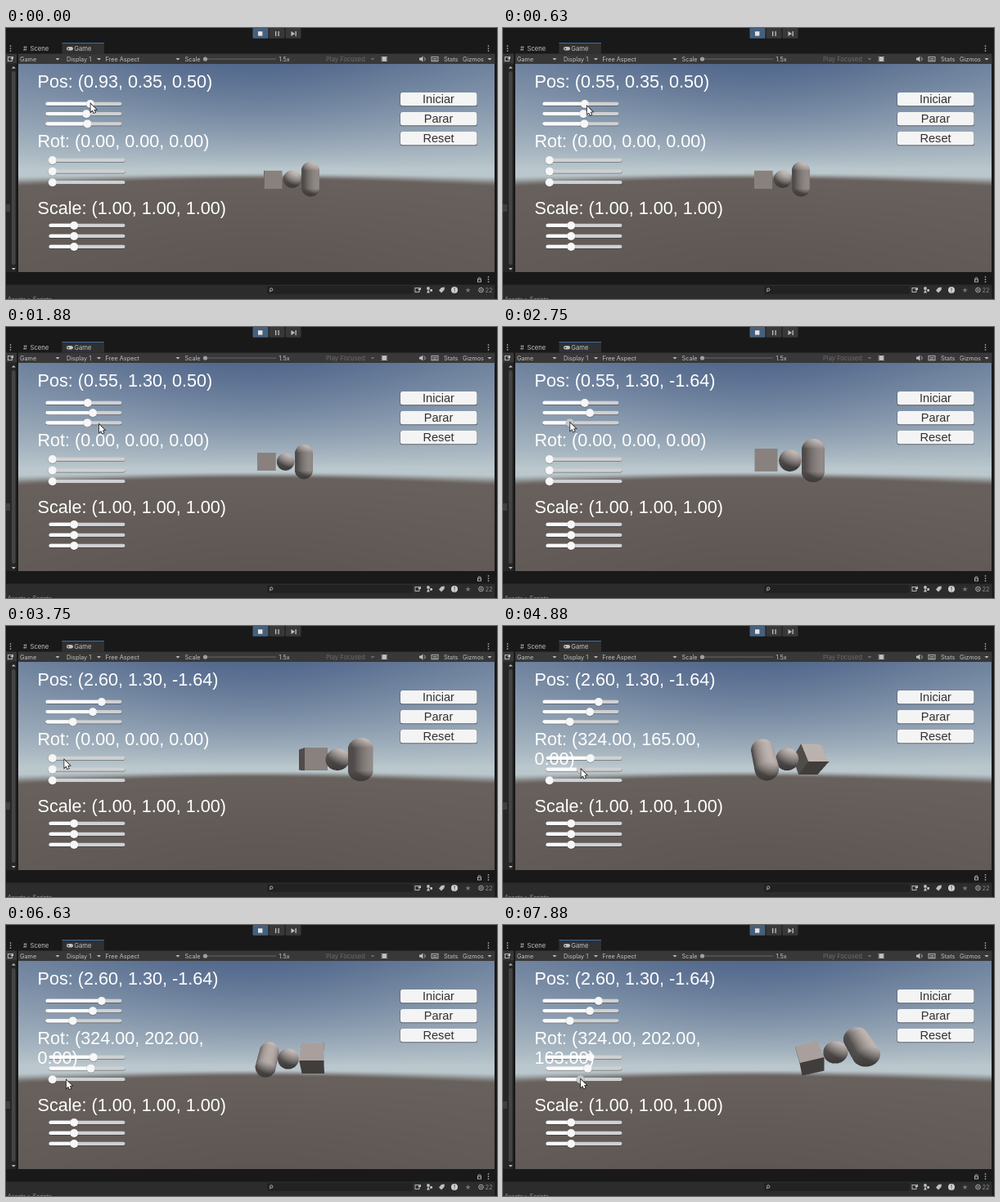
An HTML page with a canvas that plays this animation: 600x332 px, repeating every 8000 ms.

```html
<!DOCTYPE html>
<html lang="es">
<head>
<meta charset="utf-8">
<title>Transform sliders</title>
<style>
html, body { margin: 0; width: 100%; height: 100%; overflow: hidden; background: #191919; }
canvas { display: block; }
</style>
</head>
<body>
<canvas id="stage" width="600" height="332"></canvas>
<script>
const g = document.getElementById('stage').getContext('2d');
const LOOP = 8000, STEP = 125;
const VIEW = { x: 15, y: 44, w: 582, h: 255 };
const CX = 306, CY = 171.5, FOCAL = 220.8;
const UI = 'Inter, "Open Sans", sans-serif';
const LABEL = '"Liberation Sans", Arial, sans-serif';
const INK = '#c0c0c0', BAR = '#383838';

const clamp = (v, a, b) => Math.max(a, Math.min(b, v));
const mix = (a, b, u) => a + (b - a) * u;
const easeOut = u => 1 - (1 - u) ** 2;
const smooth = (a, b, v) => { const u = clamp((v - a) / (b - a), 0, 1); return u * u * (3 - 2 * u); };
const dot = (a, b) => a[0] * b[0] + a[1] * b[1] + a[2] * b[2];

// Slider groups: first row, row gap, knob place for 0 and pixels per unit
const GROUPS = {
  Pos: { left: 48.5, top: 93, gap: 12.2, zero: 95.3, unit: 8.3, start: [.93, .35, .5], textY: 73 },
  Rot: { left: 52.5, top: 162, gap: 13.65, zero: 56.8, unit: .232, start: [0, 0, 0], textY: 145.7 },
  Scale: { left: 52.5, top: 242, gap: 13, zero: 52.5, unit: 30.7, start: [1, 1, 1], textY: 227.7 }
};
const DRAGS = [
  { group: 'Pos', row: 0, from: 0, until: 500, to: .55 },
  { group: 'Pos', row: 1, from: 1250, until: 1750, to: 1.3 },
  { group: 'Pos', row: 2, from: 2000, until: 2750, to: -1.64 },
  { group: 'Pos', row: 0, from: 3000, until: 3500, to: 2.6 },
  { group: 'Rot', row: 0, from: 3875, until: 4375, to: 216 },
  { group: 'Rot', row: 1, from: 4500, until: 5156, to: 202 },
  { group: 'Rot', row: 2, from: 6875, until: 7875, to: 163 }
];

function valueAt(group, row, t) {
  let v = GROUPS[group].start[row];
  for (const d of DRAGS)
    if (d.group === group && d.row === row && t > d.from)
      v = mix(v, d.to, easeOut(Math.min(1, (t - d.from) / (d.until - d.from))));
  return v;
}
function knobAt(group, row, t) {
  const s = GROUPS[group];
  return [s.zero + s.unit * valueAt(group, row, t), s.top + s.gap * row];
}

// The pointer rides the dragged knob, then comes to the next one from its right
function pointerAt(t) {
  const i = DRAGS.findLastIndex(d => d.from <= t), d = DRAGS[i], next = DRAGS[i + 1];
  const here = knobAt(d.group, d.row, t);
  if (t <= d.until || !next) return here;
  const goal = knobAt(next.group, next.row, t), hover = [goal[0] + 14, goal[1] + 2];
  const arrive = next.from - STEP;
  return t <= arrive
    ? here.map((v, k) => mix(v, hover[k], (t - d.until) / (arrive - d.until)))
    : hover.map((v, k) => mix(v, goal[k], (t - arrive) / STEP));
}

const layer = (w, h) => Object.assign(document.createElement('canvas'), { width: w, height: h });

function rect(x, y, w, h, color, r = 0) {
  g.fillStyle = color;
  g.beginPath();
  g.roundRect(x, y, w, h, r);
  g.fill();
}
function disc(x, y, r, color) {
  g.fillStyle = color;
  g.beginPath();
  g.arc(x, y, r, 0, 7);
  g.fill();
}
function ring(x, y, r, from = 0, to = 7) {
  g.beginPath();
  g.arc(x, y, r, from, to);
  g.stroke();
}
function poly(color, ...p) {
  g.fillStyle = color;
  g.beginPath();
  for (let i = 0; i < p.length; i += 2) g.lineTo(p[i], p[i + 1]);
  g.closePath();
  g.fill();
}
function text(s, x, y, size, color = INK, family = UI, align = 'left') {
  g.font = size + 'px ' + family;
  g.textAlign = align;
  g.fillStyle = color;
  g.fillText(s, x, y);
}
const arrow = (x, y, d = 1, c = INK) => poly(c, x - 2.5, y - d, x + 2.5, y - d, x, y + 1.6 * d);
const dots = (x, y) => [-3, 0, 3].forEach(d => rect(x - .7, y + d - .7, 1.4, 1.4, INK));

// The skybox depends on the elevation of the view ray only
function bakeSky() {
  const zenith = [82, 104, 140], haze = [186, 199, 204], ground = [105, 98, 94];
  const c = layer(VIEW.w, VIEW.h), k = c.getContext('2d');
  const img = k.createImageData(VIEW.w, VIEW.h);
  let i = 0;
  for (let y = 0; y < VIEW.h; y++) for (let x = 0; x < VIEW.w; x++) {
    const dy = y + .5 + VIEW.y - CY;
    const e = dy / Math.hypot(x + VIEW.x - CX, dy, FOCAL);
    const high = clamp(-e / .5, 0, 1) ** .8, low = smooth(.025, .065, e);
    for (let n = 0; n < 3; n++)
      img.data[i++] = mix(mix(haze[n], zenith[n], high), ground[n] - 24 * e, low);
    img.data[i++] = 255;
  }
  k.putImageData(img, 0, 0);
  return c;
}
const sky = bakeSky();

function turn(v, i, j, deg) {
  const a = deg * Math.PI / 180, c = Math.cos(a), s = Math.sin(a), r = v.slice();
  r[i] = v[i] * c - v[j] * s;
  r[j] = v[i] * s + v[j] * c;
  return r;
}
const euler = (v, x, y, z) => turn(turn(turn(v, 0, 1, z), 1, 2, x), 2, 0, y);
const SUN = euler([0, 0, -1], 50, -30, 0);

// Ray-marches one solid in its local space: a cube, or a capsule with a core of length 2 * half
function drawSolid({ cube, half, c }, axes) {
  const SS = 2, local = v => axes.map(a => dot(a, v));
  const o = local(c.map(v => -v)), sun = local(SUN), up = local([0, 1, 0]);
  const dist = Math.hypot(...c), r = Math.ceil(FOCAL * 1.1 / (c[2] - .5));
  const x0 = Math.floor(CX + FOCAL * c[0] / c[2]) - r, y0 = Math.floor(CY - FOCAL * c[1] / c[2]) - r;
  const n = 2 * r * SS, out = layer(n, n), k = out.getContext('2d'), img = k.createImageData(n, n);
  for (let j = 0; j < n; j++) for (let i = 0; i < n; i++) {
    const d = local([(x0 + (i + .5) / SS - CX) / FOCAL, (CY - y0 - (j + .5) / SS) / FOCAL, 1]);
    const len = Math.hypot(...d);
    let t = dist - 1.1, gap = 1, q;
    for (let s = 0; s < 32 && t < dist + 1.1; s++) {
      q = o.map((v, a) => v + d[a] * t / len);
      if (cube) {
        gap = Math.hypot(...q.map(v => Math.max(0, Math.abs(v) - .5)));
      } else {
        q[1] -= clamp(q[1], -half, half);
        gap = Math.hypot(...q) - .5;
      }
      if (gap < .004) break;
      t += gap;
    }
    if (gap >= .004) continue;
    const far = Math.max(...q.map(Math.abs));
    const normal = q.map(v => !cube ? v * 2 : Math.abs(v) === far ? Math.sign(v) : 0);
    const shade = 80 + 20 * dot(normal, up) + 100 * Math.max(0, dot(normal, sun));
    img.data.set([shade, shade * .95, shade * .93, 255], (j * n + i) * 4);
  }
  k.putImageData(img, 0, 0);
  g.drawImage(out, x0, y0, n / SS, n / SS);
}

function drawSolids(pos, rot) {
  const axes = [[1, 0, 0], [0, 1, 0], [0, 0, 1]].map(v => euler(v, ...rot));
  const origin = [pos[0], pos[1] - 1, pos[2] + 10];
  [{ cube: true, off: 0 }, { half: 0, off: 1.14 }, { half: .5, off: 2.2 }]
    .map(s => ({ ...s, c: origin.map((v, i) => v + axes[0][i] * s.off) }))
    .sort((a, b) => b.c[2] - a.c[2])
    .forEach(s => drawSolid(s, axes));
}

function slider(x, [knob, y], held) {
  const w = 93;
  rect(x, y - 1.6, w, 4.4, 'rgba(40,44,52,.55)', 2.2);
  rect(x, y - 2.2, w, 4.2, '#cfd0d1', 2.1);
  rect(x, y - 2.2, knob - x, 4.2, '#fbfbfb', 2.1);
  disc(knob, y + .5, 5.2, 'rgba(60,60,65,.35)');
  disc(knob, y, 5, held ? '#c8c8c8' : '#f7f7f7');
}

function button(label, i) {
  const x = 482, y = 79 + 24 * i;
  rect(x - .5, y, 94.5, 17.2, 'rgba(50,55,65,.6)', 2.5);
  rect(x, y, 93.5, 16.3, '#f4f4f4', 2.5);
  text(label, x + 46.5, y + 13.3, 14.6, '#323232', LABEL, 'center');
}

function cursor([x, y]) {
  g.save();
  g.translate(x + .5, y);
  g.strokeStyle = '#222';
  g.lineWidth = 1.6;
  g.stroke(POINTER);
  g.fillStyle = '#fff';
  g.fill(POINTER);
  g.restore();
}
const POINTER = new Path2D('M0 0V9.6L2.2 7.6 3.8 11 5.4 10.3 3.9 7 6.8 6.8Z');

function drawPlayBar() {
  ['#46607c', BAR, BAR].forEach((c, i) => rect(301.5 + 20 * i, 0, 19, 12.8, c, 1));
  rect(308, 4.2, 5.4, 5.4, '#e4e4e4');
  [329, 332.5, 353.5].forEach(x => rect(x, 4, 1.3, 6, INK));
  poly(INK, 348.5, 4, 353, 7, 348.5, 10);
}

function drawTabs() {
  rect(68.5, 18, 51.5, 13.5, '#303030');
  rect(68.5, 18, 51.5, 1, '#3a6ea5');
  text('#', 21, 28, 7.5);
  text('Scene', 29.5, 28, 7.7);
  rect(74, 23, 8, 4.6, INK, 2.3);
  disc(76.2, 25.3, .9, '#303030');
  text('Game', 83.2, 28, 7.7);
  dots(5.5, 25);
  dots(589.5, 25);
}

function drawSideStrip() {
  rect(0, 31.5, 13, 12, BAR);
  g.strokeRect(2.5, 35.5, 5, 5);
  poly(INK, 5, 38, 9, 34.5, 9, 38);
  rect(0, 44, 12.5, 255, '#262626');
  rect(7, 53, 4.5, 237, '#444', 2);
  arrow(9.3, 48.5, -1);
  arrow(9.3, 295);
  rect(0, 216, 5, 9, '#3f3f3f');
}

function drawToolbar() {
  rect(15, 31.5, 582.5, 12.5, BAR);
  const items = { Game: 17, 'Display 1': 74, 'Free Aspect': 121.5, Scale: 218.5, '1.5x': 333.5, Stats: 535, Gizmos: 558 };
  for (const s in items) text(s, items[s], 40.8, 7.3);
  text('Play Focused', 391, 40.8, 7.6, '#6c6c6c');
  [63, 113.5, 210, 591].forEach(x => arrow(x, 38));
  arrow(448, 38, 1, '#6c6c6c');
  rect(241, 37.5, 89, 1, '#666');
  disc(243.5, 38, 2.6, '#a0a0a0');
  disc(462.3, 38, 2.9, INK);
  [-2.6, 0, 2.6].forEach(d => rect(458.5, 37.6 + d, 7.6, .8, INK));
  poly(INK, 505, 36.5, 507, 36.5, 509.5, 34.5, 509.5, 41.5, 507, 39.5, 505, 39.5);
  ring(509.5, 38, 2.7, -1, 1);
  g.strokeRect(520, 35.3, 8, 5.5);
  [37, 38.8].forEach(y => rect(521.5, y, 5, .8, INK));
}

function drawBottom() {
  rect(0, 314.5, 597.5, 17.5, '#2c2c2c');
  g.strokeRect(576.5, 308, 4, 3);
  ring(578.5, 307.5, 1.7, Math.PI, 0);
  dots(589.5, 308);
  rect(319, 316, 178, 10, '#222', 2.5);
  ring(324.2, 320.5, 1.7);
  poly(INK, 322.6, 321.6, 323.4, 322.2, 321.6, 324);
  g.strokeRect(500, 318.5, 5, 5);
  poly(INK, 503, 321, 507, 317.5, 507, 321);
  disc(516, 319, 1.9, INK);
  poly(INK, 514, 324.5, 516, 320.5, 518, 324.5);
  rect(518.2, 320, 2.8, 2.8, INK);
  poly(INK, 529, 321.5, 532, 318, 536, 317.5, 535.5, 321, 532, 324.5);
  disc(548, 321, 4, '#d0d0d0');
  text('!', 548, 323.8, 7.5, '#2c2c2c', UI, 'center');
  text('★', 564.5, 324, 8.5, '#777', '"DejaVu Sans", sans-serif', 'center');
  ring(580.5, 321, 2.8);
  disc(580.5, 321, 1.2, '#8a8a8a');
  text('22', 585.5, 324, 7.5, '#8a8a8a');
  text('Assets > Scripts', 2, 335, 7, '#a0a0a0');
}

function drawEditor() {
  rect(0, 0, 600, 332, '#191919');
  g.strokeStyle = INK;
  g.lineWidth = .9;
  drawPlayBar();
  drawTabs();
  drawSideStrip();
  drawToolbar();
  drawBottom();
}

function drawLabel(name, values, y) {
  const size = 21.6, [a, b, c] = values.map(v => v.toFixed(2));
  const head = `${name}: (${a}, ${b},`, tail = c + ')';
  g.font = size + 'px ' + LABEL;
  const lines = g.measureText(head + ' ' + tail).width > 232 ? [head, tail] : [head + ' ' + tail];
  lines.forEach((l, i) => text(l, 38.5, y + i * 24.5, size, '#fff', LABEL));
}

function draw(t) {
  const rows = [0, 1, 2], values = {};
  for (const name in GROUPS) values[name] = rows.map(row => valueAt(name, row, t));
  // Pitch past 90 degrees is read back mirrored
  const [rx, ry, rz] = values.Rot;
  values.Rot = [rx > 90 ? (540 - rx) % 360 : rx, ry, rz].map(Math.round);

  drawEditor();
  g.save();
  g.beginPath();
  g.rect(VIEW.x, VIEW.y, VIEW.w, VIEW.h);
  g.clip();
  g.drawImage(sky, VIEW.x, VIEW.y);
  drawSolids(values.Pos, values.Rot);
  const active = DRAGS.find(d => t > d.from && t <= d.until);
  for (const name in GROUPS) {
    for (const row of rows)
      slider(GROUPS[name].left, knobAt(name, row, t), active?.group === name && active.row === row);
    drawLabel(name, values[name], GROUPS[name].textY);
  }
  ['Iniciar', 'Parar', 'Reset'].forEach(button);
  cursor(pointerAt(t));
  g.restore();
}

let shown = -1;
function tick() {
  const step = Math.floor(performance.now() % LOOP / STEP);
  if (step !== shown) draw((shown = step) * STEP);
  requestAnimationFrame(tick);
}
tick();
</script>
</body>
</html>
```
